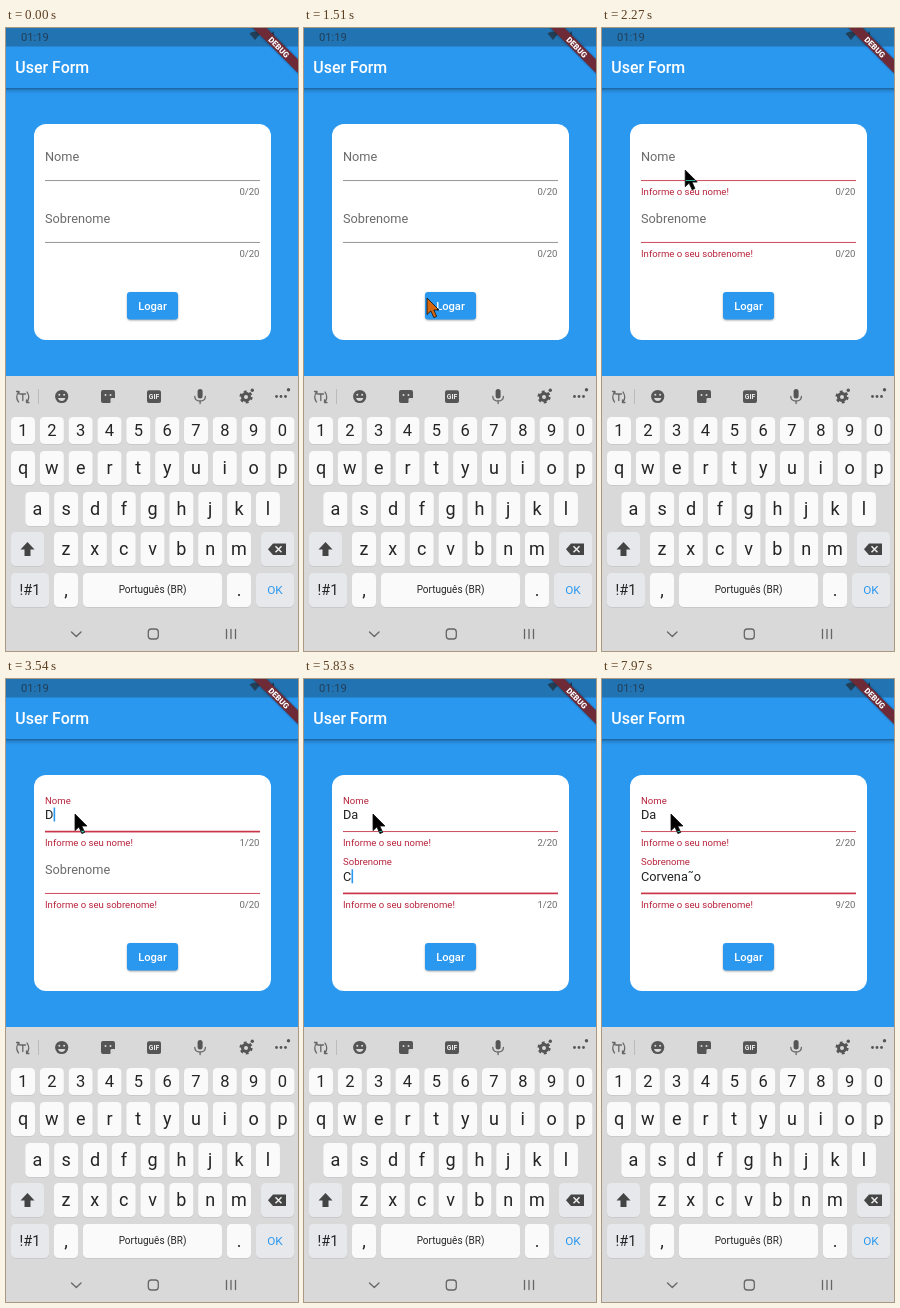
Animation, 292 px wide and 623 px high, one loop 8 s. Source, as an HTML page:

```html
<!DOCTYPE html>
<html lang="pt">
<head>
<meta charset="utf-8">
<title>User Form</title>
<style>
  html, body { margin: 0; width: 100%; height: 100%; overflow: hidden; background: #2b98f0; }
  svg { display: block; width: 100%; height: 100%; font-family: Roboto, sans-serif; }
  text { white-space: pre; }
  .mid { text-anchor: middle; }
  .icon { fill: #555; }
  .line { fill: none; stroke: #666; stroke-width: 1.3; stroke-linecap: round; stroke-linejoin: round; }
  .invert { mix-blend-mode: difference; fill: #fff; }
</style>
</head>
<body>
<svg viewBox="0 0 292 623">
  <defs>
    <linearGradient id="barShadow" x2="0" y2="1">
      <stop offset="0" stop-opacity=".36"/>
      <stop offset=".4" stop-opacity=".13"/>
      <stop offset="1" stop-opacity="0"/>
    </linearGradient>
    <filter id="soft" x="-20%" y="-40%" width="140%" height="190%"><feGaussianBlur stdDeviation="1.2"/></filter>
    <path id="arrow" d="M0 0V16.6L3.9 13L6.9 19.6L9.7 18.4L6.8 12H12Z"/>
  </defs>

  <rect width="292" height="623" fill="#2b98f0"/>
  <rect width="292" height="18.5" fill="#2273b2"/>
  <rect y="60" width="292" height="6" fill="url(#barShadow)"/>
  <text x="15" y="12.6" font-size="11.2" fill="#223f58">01:19</text>
  <g fill="#223f58">
    <path d="M243.5 5.5Q249 1.5 254.500 5.500L249 12Z"/>
    <path d="M259 12L268 3V12Z"/>
  </g>
  <text x="9.300" y="44.600" font-size="15.950" font-weight="500" fill="#fff">User Form</text>
  <g transform="translate(292 0) rotate(45)">
    <rect x="-34" y="22.300" width="68" height="9.600" opacity=".45" filter="url(#soft)"/>
    <rect x="-34" y="22.300" width="68" height="9.600" fill="#6e2a36"/>
    <text class="mid" y="30" font-size="8" font-weight="900" fill="#fff">DEBUG</text>
  </g>

  <rect x="28" y="96" width="237" height="216" rx="12" fill="#fff"/>
  <g id="form"></g>
  <rect x="121.300" y="265.200" width="50.500" height="27" rx="3" opacity=".4" filter="url(#soft)"/>
  <rect x="121" y="264" width="51" height="27.500" rx="3" fill="#2b98f0"/>
  <text class="mid" x="146.500" y="281.600" font-size="11.160" font-weight="500" fill="#fff">Logar</text>

  <rect y="348" width="292" height="275" fill="#d9d9d9"/>
  <g class="icon">
    <circle cx="55.700" cy="368.500" r="6.600"/>
    <path d="M97 362H107Q109 362 109 364V370L104 375H97Q95 375 95 373V364Q95 362 97 362Z"/>
    <rect x="141" y="362.300" width="14" height="12.700" rx="2"/>
    <rect x="191.600" y="361" width="5" height="9.500" rx="2.500"/>
    <circle cx="246.300" cy="362.300" r="1.700"/>
    <circle cx="282.500" cy="361.800" r="1.700"/>
    <circle cx="270.500" cy="368.500" r="1.400"/>
    <circle cx="275" cy="368.500" r="1.400"/>
    <circle cx="279.500" cy="368.500" r="1.400"/>
    <circle cx="240" cy="369" r="5"/>
    <circle cx="240" cy="369" r="5.400" fill="none" stroke="#555" stroke-width="2.400" stroke-dasharray="2.830"/>
  </g>
  <g fill="#d9d9d9">
    <circle cx="53.300" cy="366.800" r="1"/>
    <circle cx="58.100" cy="366.800" r="1"/>
    <path d="M52 370H59.400Q58.500 373 55.700 373T52 370Z"/>
    <circle cx="99.500" cy="367" r="1"/>
    <circle cx="104.500" cy="367" r="1"/>
    <path d="M104.500 375V371Q104.500 370 106 370H109.500Z"/>
    <circle cx="240" cy="369" r="2"/>
    <text class="mid" x="148" y="371.200" font-size="6.800" font-weight="700" fill="#eee">GIF</text>
  </g>
  <path d="M32.500 361V376" stroke="#bbb"/>
  <g class="line">
    <path d="M188.800 368.500Q189 373 194.100 373T199.400 368.500M194.100 373V375.500"/>
    <path d="M12.500 374Q9 369 12.500 364M10.500 363.500H13V366M21 364Q24.500 369 21 374M23 374.500H20.500V372"/>
    <path d="M14 366H19.500M16.800 366V372.500"/>
    <path d="M65.500 604L70.300 608.500L75 604"/>
    <rect x="142.300" y="601" width="10" height="10" rx="3"/>
    <path d="M220.500 601.500V610.500M225 601.500V610.500M229.500 601.500V610.500"/>
  </g>
  <g id="keys"></g>
  <g fill="#444">
    <path d="M21.500 514L28.500 521.500H24.500V528H18.500V521.500H14.500Z"/>
    <path d="M262 521.300L267 515.500H280V527H267Z"/>
    <path d="M269.500 518.300L275.500 524.300M275.500 518.300L269.500 524.300" stroke="#eee" stroke-width="1.500"/>
  </g>

  <g id="pointer">
    <use href="#arrow" class="invert"/>
  </g>
  <use href="#arrow" id="outline" fill="none" stroke="#111" stroke-width=".8"/>
</svg>

<script>
const LOOP = 8000, BLUE = '#2b98f0', RED = '#b8233b', GRAY = '#6b6b6b';
const byId = id => document.getElementById(id);

function add(parent, tag, attrs, content = '') {
  const node = document.createElementNS('http://www.w3.org/2000/svg', tag);
  set(node, attrs);
  node.textContent = content;
  return parent.appendChild(node);
}
function set(node, attrs) {
  for (const name in attrs) node.setAttribute(name, attrs[name]);
}

// Keyboard
function key(x, y, w, h, label, size, { fill = '#fafafa', color = '#252525', drop = size * .34 } = {}) {
  add(byId('keys'), 'rect', { x, y: y + .8, width: w, height: h, rx: 4.5, fill: '#c5c5c7' });
  add(byId('keys'), 'rect', { x, y, width: w, height: h, rx: 4.5, fill });
  add(byId('keys'), 'text', { x: x + w / 2, y: y + h / 2 + drop, 'font-size': size, fill: color, class: 'mid' }, label);
}
function keyRow(chars, x, y, h, size) {
  [...chars].forEach((char, i) => key(x + i * 28.83, y, 24, h, char, size));
}
const special = { fill: '#e7e8eb' };
keyRow('1234567890', 5, 389, 27, 16.5);
keyRow('qwertyuiop', 5, 423, 34, 18);
keyRow('asdfghjkl', 19.3, 464, 34, 18);
keyRow('zxcvbnm', 48, 504, 34, 18);
key(5, 504, 33, 34, '', 14, special);
key(255, 504, 33, 34, '', 14, special);
key(5, 545, 38, 34, '!#1', 14.5, special);
key(48, 545, 24, 34, ',', 18);
key(77, 545, 139, 34, 'Português (BR)', 10);
key(221, 545, 24, 34, '.', 18);
key(250, 545, 38, 34, 'OK', 11.8, { ...special, color: BLUE });

// Form fields
const ERROR_AT = 1720;
const smooth = x => { x = Math.min(1, Math.max(0, x)); return x * x * (3 - 2 * x); };
// Value of the last [time, value] step already reached
const current = (steps, t, initial) => steps.reduce((value, [at, next]) => t >= at ? next : value, initial);

function makeField(top, label, error, timing) {
  const form = byId('form');
  const text = (x, y, size, fill, content, extra) =>
    add(form, 'text', { x, y, 'font-size': size, fill, ...extra }, content);
  const line = add(form, 'rect', { x: 39, width: 215 });
  const title = text(39, 0, 12.75, GRAY, label);
  const value = text(39, top + 44.3, 12.75, '#222', '');
  const caret = add(form, 'rect', { y: top + 32.5, width: 1.6, height: 14 });
  const warning = text(39, top + 71, 9.57, RED, error);
  const counter = text(253.5, top + 71, 9.57, GRAY, '', { 'text-anchor': 'end' });

  return t => {
    const failed = t >= ERROR_AT;
    const focused = t >= timing.focus && t < timing.blur;
    const elapsed = Math.floor((t - timing.floatStart) / 70) * 70;
    const lift = smooth(elapsed / timing.floatTime);
    const typed = current(timing.typing, t, '');
    const thick = focused ? 1.7 : .9;

    set(line, { y: top + 56.6 - thick / 2, height: thick, fill: failed ? '#c9364a' : '#8c8c8c' });
    set(title, { y: top + 37.4 - 8.8 * lift, 'font-size': 12.75 - 3.18 * lift, fill: lift ? RED : GRAY });
    set(warning, { opacity: +failed });
    value.textContent = typed;
    counter.textContent = typed.length + '/20';
    set(caret, {
      x: 39.2 + value.getComputedTextLength(),
      fill: typed ? BLUE : RED,
      opacity: +(focused && current(timing.caret, t, true))
    });
  };
}

const surname = 'Corvena˜o';
const fields = [
  makeField(96, 'Nome', 'Informe o seu nome!', {
    focus: 3140, blur: 4550, floatStart: 3070, floatTime: 140,
    typing: [[3540, 'D'], [3610, 'Da']],
    caret: [[4080, false]]
  }),
  makeField(157.8, 'Sobrenome', 'Informe o seu sobrenome!', {
    focus: 4550, blur: LOOP, floatStart: 4550, floatTime: 210,
    typing: [[5830, 1], [6030, 3], [6100, 4], [6830, 5], [7370, 7], [7500, 9]]
      .map(([at, count]) => [at, surname.slice(0, count)]),
    caret: [[5090, false], [5560, true], [6630, false], [6830, true], [7970, false]]
  })
];

// Pointer: [time, x, y]
const path = [
  [180, 286, 602], [390, 228, 484], [600, 164, 376], [740, 142, 322], [880, 139, 281],
  [1020, 138, 281], [1300, 126, 272], [1510, 123, 270], [1650, 142, 269], [1790, 145, 269],
  [2000, 112, 202], [2270, 75, 125], [2400, 75, 125], [2540, 69, 135], [LOOP, 69, 135]
];
function pointerAt(t) {
  const base = t < 2400 ? 180 : 2400;
  const time = base + Math.floor((t - base) / 70) * 70;
  const next = Math.max(1, path.findIndex(point => point[0] > time));
  const [t0, x0, y0] = path[next - 1], [t1, x1, y1] = path[next];
  const k = (time - t0) / (t1 - t0);
  return [x0 + (x1 - x0) * k, y0 + (y1 - y0) * k];
}

const pointer = byId('pointer').firstElementChild, outline = byId('outline');
function draw(now) {
  const t = now % LOOP;
  fields.forEach(update => update(t));
  const [x, y] = pointerAt(t);
  for (const part of [pointer, outline]) {
    set(part, { transform: `translate(${x} ${y})`, visibility: t < 180 ? 'hidden' : 'visible' });
  }
  requestAnimationFrame(draw);
}
requestAnimationFrame(draw);
</script>
</body>
</html>
```
